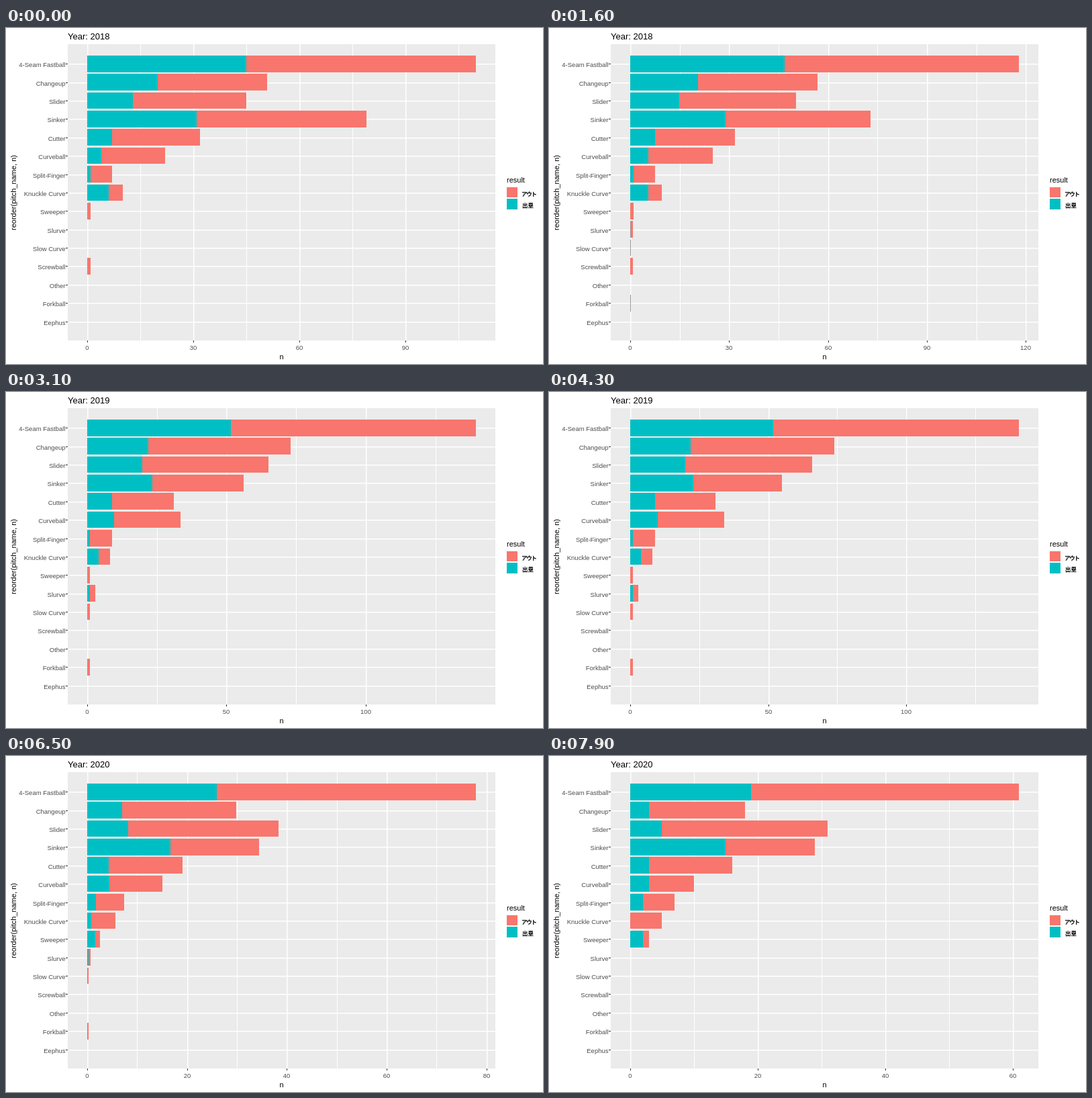
Recreate the animation shown at these times as an HTML page with a canvas. Size 800x500 px, loop 8000 ms.

```html
<!DOCTYPE html>
<html lang="en">
<head>
<meta charset="utf-8">
<title>Pitch results by year</title>
<style>
  html, body { margin: 0; width: 100%; height: 100%; overflow: hidden; background: #fff; }
  canvas { display: block; }
</style>
</head>
<body>
<canvas id="chart" width="800" height="500"></canvas>
<script>
const ctx = document.getElementById('chart').getContext('2d');
const OUT = '#F8766D', ON_BASE = '#00BFC4', THIN = '#999999';
const PANEL = { left: 92, top: 24, right: 729, bottom: 465 };
const ZERO_X = 120.95, PLOT_W = 579.1, ROW = 27.39, BAR_TOP = 40.85, BAR_H = 24.65;
const YEARS = [2018, 2019, 2020], TRANSITION = 4000, TICK = 100;
const SANS = '"Liberation Sans", Arial, sans-serif';

const pitches = ['4-Seam Fastball', 'Changeup', 'Slider', 'Sinker', 'Cutter', 'Curveball',
  'Split-Finger', 'Knuckle Curve', 'Sweeper', 'Slurve', 'Slow Curve', 'Screwball',
  'Other', 'Forkball', 'Eephus'];

// Per year and pitch: times on base, and total.
const onBase = [
  [45, 20, 13, 31, 7, 4, 1, 6],
  [52, 22, 20, 23, 9, 10, 1, 4, 0, 1],
  [19, 3, 5, 15, 3, 3, 2, 0, 2]
];
const total = [
  [110, 51, 45, 79, 32, 22, 7, 10, 1, 0, 0, 1],
  [141, 74, 66, 55, 31, 34, 9, 8, 1, 3, 1, 0, 0, 1],
  [61, 18, 31, 29, 16, 10, 7, 5, 3]
];

const cubicInOut = x => x < 0.5 ? 4 * x ** 3 : 1 - 4 * (1 - x) ** 3;

function rect(x0, y0, x1, y1, color) {
  ctx.fillStyle = color;
  ctx.fillRect(x0, y0, x1 - x0, y1 - y0);
}

function text(str, x, y, size, color = '#000', align = 'left') {
  ctx.font = `${size}px ${SANS}`;
  ctx.fillStyle = color;
  ctx.textAlign = align;
  ctx.fillText(str, x, y);
}

// Extended Wilkinson labelling: weigh simplicity, coverage and density.
function breakStep(max) {
  const lo = -0.05 * max, hi = 1.05 * max, span = hi - lo;
  let best = -Infinity, result;
  [10, 50, 20, 40, 30].forEach((step, i) => {
    for (const count of [Math.floor(hi / step), Math.ceil(hi / step)]) {
      if (!count) continue;
      const end = count * step;
      const coverage = 1 - 0.5 * ((hi - end) ** 2 + lo ** 2) / (0.1 * span) ** 2;
      const ratio = (Math.max(end, hi) - lo) / (4 * step);
      const density = 2 - Math.max(ratio, 1 / ratio);
      const score = 0.25 * (1 - i / 4) + 0.2 * coverage + 0.5 * density;
      if (score > best) { best = score; result = step; }
    }
  });
  return result;
}

function bar(x0, x1, row, color) {
  const left = Math.round(x0), right = Math.round(x1);
  const top = BAR_TOP + row * ROW;
  rect(left, Math.round(top), right, Math.round(top + BAR_H), right - left === 1 ? THIN : color);
}

function drawLegend() {
  text('result', 746, 230, 11);
  rect(746, 237, 762, 252, OUT);
  rect(746, 254, 762, 270, ON_BASE);
  ctx.font = 'bold 8.5px "Noto Sans CJK JP", "Noto Sans CJK", sans-serif';
  ctx.fillStyle = '#000';
  ctx.letterSpacing = '-1.3px';
  ctx.fillText('アウト', 768, 250);
  ctx.letterSpacing = '0px';
  ctx.fillText('出塁', 769, 267);
}

function draw(time) {
  const from = Math.floor(time / TRANSITION);
  const phase = (time % TRANSITION) / TRANSITION;
  const ease = cubicInOut(phase);
  const value = (data, i) => {
    const a = data[from][i] || 0, b = data[from + 1][i] || 0;
    return a + (b - a) * ease;
  };
  const max = value(total, 0);
  const toX = n => ZERO_X + n / max * PLOT_W;

  rect(0, 0, 800, 500, '#fff');
  rect(PANEL.left, PANEL.top, PANEL.right, PANEL.bottom, '#EBEBEB');
  text('Year: ' + YEARS[from + (phase >= 0.5)], 92, 17, 13);

  const step = breakStep(max);
  for (let n = 0; n <= 1.05 * max; n += step / 2) {
    const x = Math.round(toX(n)), major = n % step === 0;
    rect(x, PANEL.top, x + (major ? 1.5 : 1), PANEL.bottom, '#fff');
    if (major) {
      rect(x, PANEL.bottom, x + 1, PANEL.bottom + 3, '#333');
      text(n, x, 479, 9.5, '#4D4D4D', 'center');
    }
  }

  pitches.forEach((name, i) => {
    const y = Math.round(BAR_TOP + BAR_H / 2 + i * ROW);
    rect(PANEL.left, y, PANEL.right, y + 1.5, '#fff');
    rect(PANEL.left - 3, y, PANEL.left, y + 1, '#333');
    text(name, 88.5, y + 5, 9.5, '#4D4D4D', 'right');
  });
  pitches.forEach((name, i) => {
    const split = toX(value(onBase, i));
    bar(split, toX(value(total, i)), i, OUT);
    bar(ZERO_X, split, i, ON_BASE);
  });

  text('n', 410.5, 493, 11, '#000', 'center');
  ctx.save();
  ctx.translate(15, 245);
  ctx.rotate(-Math.PI / 2);
  text('reorder(pitch_name, n)', 0, 0, 11, '#000', 'center');
  ctx.restore();
  ctx.textAlign = 'left';
  drawLegend();
}

const start = performance.now();
function loop() {
  const elapsed = (performance.now() - start) % (2 * TRANSITION);
  draw(Math.floor(elapsed / TICK) * TICK);
  requestAnimationFrame(loop);
}
loop();
</script>
</body>
</html>
```
